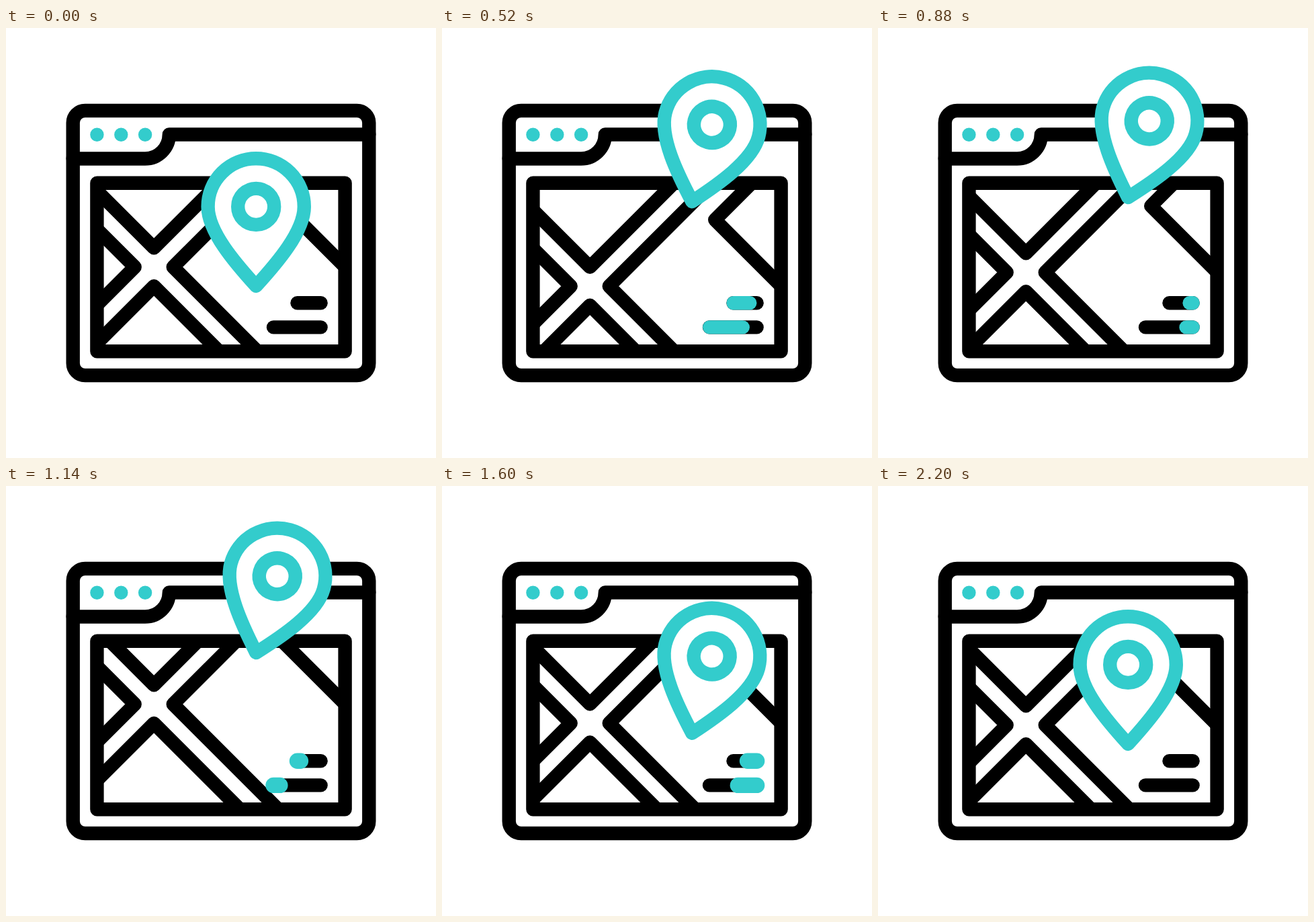
An HTML page with a canvas for the animation above (3000 ms loop, 640 by 640 pixels).

```html
<!DOCTYPE html>
<html lang="en">
<head>
<meta charset="utf-8">
<title>Map pin</title>
<style>
  html, body { margin: 0; width: 100%; height: 100%; overflow: hidden; background: #fff; }
  canvas { display: block; }
</style>
</head>
<body>
<canvas id="stage" width="640" height="640"></canvas>
<script>
const ctx = document.getElementById('stage').getContext('2d');
const LOOP = 3000;
const LINE = 20.4;
const BLACK = '#000';
const TEAL = '#33cccc';

// Keyframes as [time, value], eased with a sine curve between neighbours.
const MAP_Y = [[0, 0], [663, 32], [1181, -32], [1375, -32], [1655, 0]];
const PIN_Y = [[0, 0], [645, -138], [950, -131], [1250, -138], [1395, -138], [1660, 0]];
const PIN_TILT = [[0, 0], [620, 15.5], [1545, 15.5], [1920, -4], [2200, 0]];

const SWEEPS = [{ start: 204, width: LINE }, { start: 1019, width: 23.4 }];
const SWEEP_TIME = 500;
const SWEEP_LAG = 300;
const BARS = [{ x: 433.5, y: 409.3 }, { x: 398, y: 445.4 }];
const BAR_END = 468.6;

function ease(u) {
  const c = Math.min(1, Math.max(0, u));
  return (1 - Math.cos(Math.PI * c)) / 2;
}

function valueAt(keys, t) {
  for (let i = 1; i < keys.length; i++) {
    const [t0, v0] = keys[i - 1];
    const [t1, v1] = keys[i];
    if (t < t1) return v0 + (v1 - v0) * ease((t - t0) / (t1 - t0));
  }
  return keys[keys.length - 1][1];
}

function stroke(path, color, width = LINE) {
  ctx.strokeStyle = color;
  ctx.lineWidth = width;
  ctx.stroke(path);
}

function disc(x, y, r, color) {
  ctx.fillStyle = color;
  ctx.beginPath();
  ctx.arc(x, y, r, 0, 2 * Math.PI);
  ctx.fill();
}

const windowFrame = new Path2D();
windowFrame.roundRect(99.7, 123, 440.6, 394, 18);
const tabLine = new Path2D('M99.7 194.5H207a35.8 36 0 0 0 35.8-36H540.3');
const mapFrame = new Path2D('M135.4 230.7H504.6V481.3H135.4Z');

// Street corners: diagonal pairs that meet at a vertex.
const corner = (x, y, ax, ay, bx, by) =>
  `M${x + 400 * ax} ${y + 400 * ay}L${x} ${y}L${x + 400 * bx} ${y + 400 * by}`;
const streets = new Path2D([
  corner(220.2, 327.3, -1, -1, 1, -1),
  corner(191.7, 355.8, -1, -1, -1, 1),
  corner(220.2, 384.3, -1, 1, 1, 1),
  corner(248.7, 355.8, 1, -1, 1, 1),
  corner(406.2, 257, 1, -1, 1, 1)
].join(''));

// The pin is drawn relative to its tip.
const TIP = { x: 372.2, y: 384 };
const HEAD_Y = -118.1;
const pin = new Path2D(
  `M0 0C-31 -34 -71.6 -81 -71.6 ${HEAD_Y}` +
  `A71.6 71.6 0 0 1 71.6 ${HEAD_Y}C71.6 -81 31 -34 0 0Z`);
const pinRing = new Path2D();
pinRing.arc(0, HEAD_Y, 27, 0, 2 * Math.PI);

function drawMap(t) {
  ctx.save();
  ctx.clip(mapFrame);
  ctx.translate(0, valueAt(MAP_Y, t));
  stroke(streets, BLACK);
  ctx.restore();
  stroke(mapFrame, BLACK);
}

function drawBar({ x, y }, from, to, color, width) {
  const length = BAR_END - x;
  const line = new Path2D();
  line.moveTo(x + length * from, y);
  line.lineTo(x + length * to + 0.01, y);
  stroke(line, color, width);
}

function drawBars(t) {
  for (const bar of BARS) {
    drawBar(bar, 0, 1, BLACK, LINE);
    for (const { start, width } of SWEEPS) {
      const age = t - start;
      if (age <= 0 || age >= SWEEP_TIME + SWEEP_LAG) continue;
      drawBar(bar, ease((age - SWEEP_LAG) / SWEEP_TIME), ease(age / SWEEP_TIME), TEAL, width);
    }
  }
}

function drawPin(t) {
  ctx.save();
  ctx.translate(TIP.x, TIP.y + valueAt(PIN_Y, t));
  ctx.rotate(valueAt(PIN_TILT, t) * Math.PI / 180);
  ctx.fillStyle = '#fff';
  ctx.fill(pin);
  stroke(pin, TEAL);
  stroke(pinRing, TEAL);
  ctx.restore();
}

function draw(t) {
  ctx.fillStyle = '#fff';
  ctx.fillRect(0, 0, 640, 640);
  ctx.lineCap = ctx.lineJoin = 'round';
  stroke(windowFrame, BLACK);
  stroke(tabLine, BLACK);
  for (const x of [135.4, 171.3, 207.1]) disc(x, 158.7, 10.2, TEAL);
  drawMap(t);
  drawBars(t);
  drawPin(t);
}

const begin = performance.now();
function tick() {
  draw((performance.now() - begin) % LOOP);
  requestAnimationFrame(tick);
}
tick();
</script>
</body>
</html>
```
